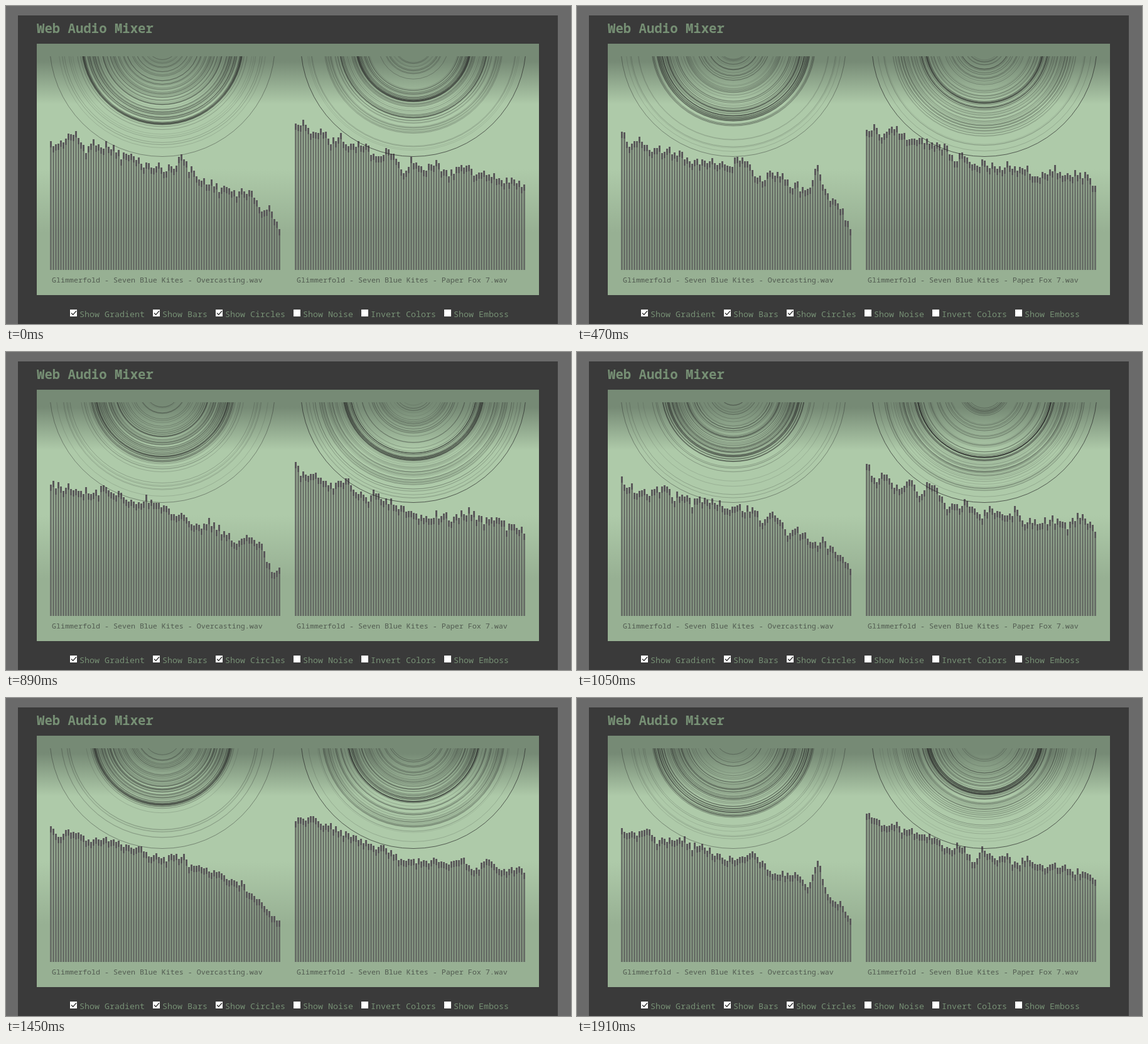
These frames come from a looping animation (900x506 px, 1.96 s). An HTML page with a canvas:

```html
<!DOCTYPE html>
<html lang="en">
<head>
<meta charset="utf-8">
<title>Web Audio Mixer</title>
<style>
  html, body { margin: 0; width: 100%; height: 100%; overflow: hidden; background: #6a6a6a; }
  canvas, svg { position: absolute; left: 0; top: 0; display: block; }
  text { font-family: "Noto Sans Mono", "DejaVu Sans Mono", monospace; white-space: pre; fill: #768f74; }
  .title { font-size: 20.67px; font-weight: 700; }
  .file { font-size: 11.67px; fill: #515a50; }
  .label { font-size: 13.33px; }
</style>
</head>
<body>
<canvas width="900" height="506"></canvas>
<svg width="900" height="506">
  <text class="title" x="49" y="43">Web Audio Mixer</text>
  <text class="file" x="73" y="440">Glimmerfold - Seven Blue Kites - Overcasting.wav</text>
  <text class="file" x="463" y="440">Glimmerfold - Seven Blue Kites - Paper Fox 7.wav</text>
  <g id="options"></g>
</svg>
<script>
const ctx = document.querySelector('canvas').getContext('2d');
const LOOP = 1960, STEPS = 46, STEP_MS = 41.4, BARS = 92;

// Checkbox row: the first three are ticked
const names = ['Show Gradient', 'Show Bars', 'Show Circles', 'Show Noise', 'Invert Colors', 'Show Emboss'];
let optionX = 102;
document.getElementById('options').innerHTML = names.map((name, i) => {
  const x = optionX;
  optionX += 28 + name.length * 8;
  const tick = `<path d="M${x + 2} 488.5l2.7 2.8 5.3-6" fill="none" stroke="#333" stroke-width="1.3"/>`;
  return `<rect x="${x}" y="483" width="11" height="11" fill="#fff"/>${i < 3 ? tick : ''}
    <text class="label" x="${x + 15}" y="495">${name}</text>`;
}).join('');

// slope: height of the bar tops for u in 0..1
// bumps: [bar, width in bars, rise, loop phase, duration in phase]
// centre: radius of the densest rings; bands: [rings, offset from centre, spread, opacity]
const tracks = [
  {
    seed: 1, barX: 70, ringX: 249, rim: .42,
    slope: u => 208 + 85 * u + 55 * u ** 6,
    bumps: [[52, 2, 28, 0, .03], [78, 2, 45, .217, .05], [78, 2, 45, .98, .012], [0, 25, -42, .61, .06]],
    centre: phase => 111 + 11 * Math.cos(phase * 2 * Math.PI),
    bands: [[18, 0, 10, .28], [22, -14, 30, .22]]
  },
  {
    seed: 21, barX: 460, ringX: 649, rim: .7,
    slope: u => 188 + 66 * Math.min(1, 2 * u) + 24 * u ** 5,
    bumps: [[46, 1.5, 18, .1, .15], [0, 2, 16, .5, .1]],
    centre: phase => 100 - 8 * Math.cos((phase - .03) * 2 * Math.PI),
    bands: [[14, 0, 6, .38], [28, 29, 24, .22]]
  }
];

const lerp = (a, b, k) => a + (b - a) * k;
const bell = x => Math.exp(-x * x);

function rnd(a, b, c) {
  const v = Math.sin(a * 12.9898 + b * 78.233 + c * 37.719) * 43758.5453;
  return v - Math.floor(v);
}

// Random value that changes over two updates and repeats with the loop
function drift(id, seed, step) {
  const cell = Math.floor(step / 2);
  return lerp(rnd(id, seed, cell), rnd(id, seed, (cell + 1) % (STEPS / 2)), step / 2 - cell);
}

function barTop(track, bar, step) {
  const pos = bar / 3.5, cell = Math.floor(pos);
  const wave = lerp(drift(cell, track.seed + 5, step), drift(cell + 1, track.seed + 5, step), pos - cell);
  const grain = drift(bar, track.seed, step);
  const rise = track.bumps.reduce((sum, [at, width, height, when, span]) => {
    const d = Math.abs(step / STEPS - when);
    return sum + height * bell((bar - at) / width) * bell(Math.min(d, 1 - d) / span);
  }, 0);
  return Math.round(track.slope(bar / (BARS - 1)) - rise + (wave - .5) * 25 + (grain - .5) * 14);
}

function drawBars(track, step) {
  for (let bar = 0; bar < BARS; bar++) {
    const x = track.barX + bar * 4, top = barTop(track, bar, step);
    ctx.fillStyle = '#5a585a';
    ctx.fillRect(x, top, 3, 10);
    ctx.fillStyle = 'rgba(88,90,88,.75)';
    ctx.fillRect(x, top + 10, 3, 410 - top);
  }
}

function drawRing(x, r, opacity) {
  ctx.strokeStyle = `rgba(40,40,40,${opacity})`;
  ctx.beginPath();
  ctx.arc(x, 60, r, 0, Math.PI);
  ctx.stroke();
}

function drawRings(track, step) {
  const { seed, ringX } = track;
  const centre = track.centre(step / STEPS);
  const bands = [...track.bands, [42, 78 - centre, 54, .24], [6, 152 - centre, 24, .16]];
  bands.forEach(([count, offset, spread, opacity], n) => {
    for (let i = 0; i < count; i++) {
      const id = n * 100 + i;
      const r = centre + offset + spread * (2 * drift(id, seed + 9, step) - 1);
      drawRing(ringX, r, opacity * (.4 + 1.1 * rnd(id, seed, 3)));
    }
  });
  drawRing(ringX, 179.5, track.rim);
}

const shade = ctx.createLinearGradient(0, 60, 0, 460);
[[.07, '#768a75'], [.24, '#aecaa9'], [.5, '#aecaa9'], [.75, '#97b093']]
  .forEach(stop => shade.addColorStop(...stop));

function draw(t) {
  // The picture rests for a moment early in the loop
  const active = t - Math.max(0, Math.min(60, t - 160));
  const step = Math.floor((active + 13) / STEP_MS) % STEPS;

  ctx.fillStyle = '#6a6a6a';
  ctx.fillRect(0, 0, 900, 506);
  ctx.fillStyle = '#3a3a3a';
  ctx.fillRect(19, 15, 860, 491);
  ctx.fillStyle = shade;
  ctx.fillRect(49, 60, 800, 400);

  tracks.forEach(track => drawBars(track, step));
  ctx.save();
  ctx.beginPath();
  ctx.rect(49, 80, 800, 380);
  ctx.clip();
  tracks.forEach(track => drawRings(track, step));
  ctx.restore();
}

const begin = performance.now();
function tick() {
  draw((performance.now() - begin) % LOOP);
  requestAnimationFrame(tick);
}
tick();
</script>
</body>
</html>
```
